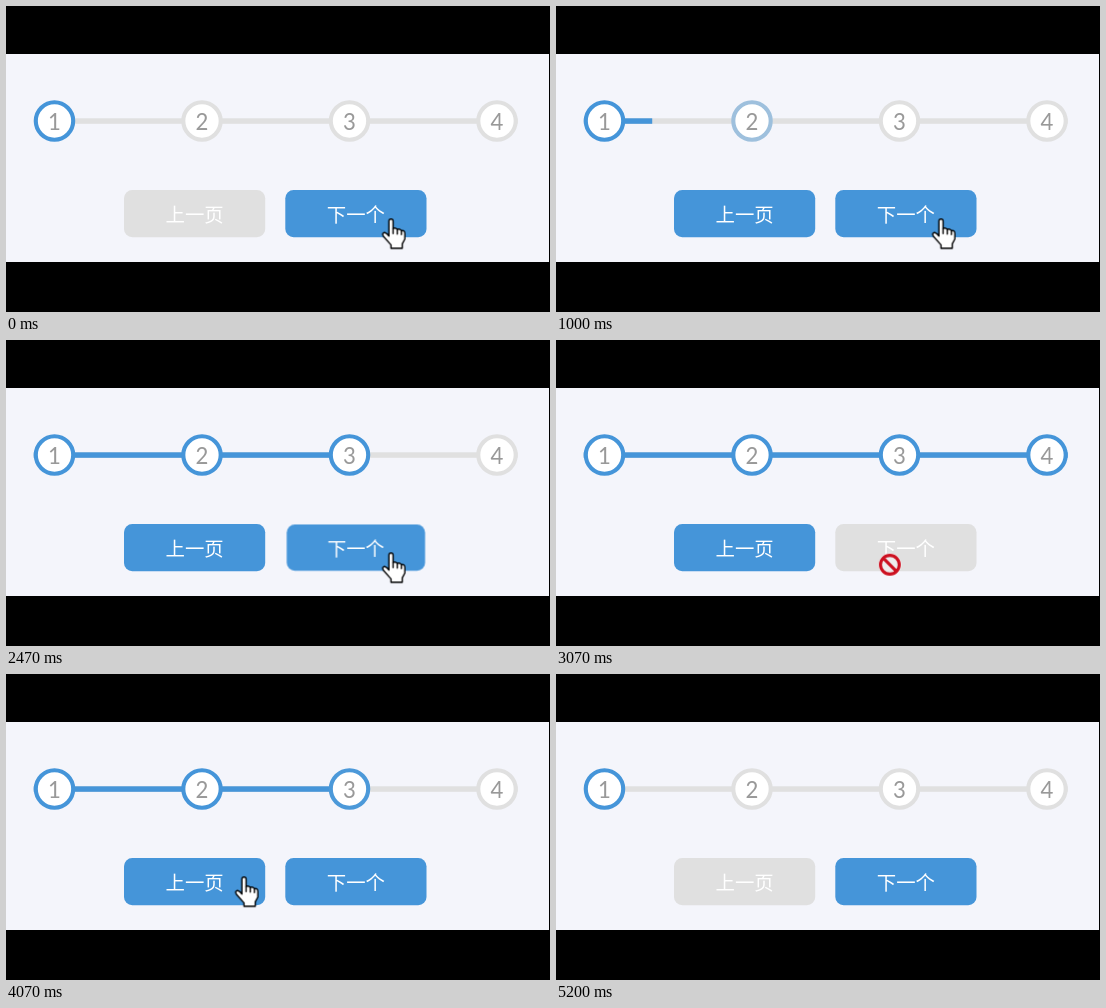
Animation, 544 px wide and 306 px high, one loop 5790 ms. Source, as an HTML page:

```html
<!DOCTYPE html>
<html lang="zh">
<head>
<meta charset="utf-8">
<title>Progress steps</title>
<style>
  html, body { margin: 0; width: 100%; height: 100%; overflow: hidden; background: #000; }
  svg { display: block; width: 544px; height: 306px; }
  text { text-anchor: middle; }
  .step circle { fill: #fff; stroke: #e0e0e0; stroke-width: 4.1px; }
  .step text { font: 22.2px Lato, "Open Sans", sans-serif; fill: #999; }
  .button { transform-box: fill-box; transform-origin: center; }
  .button rect { fill: #e0e0e0; }
  .button text { font: 19.4px "Noto Sans CJK SC", "Noto Sans CJK", sans-serif; fill: #fff; }
  #bar { transform-origin: 27.7px 115px; }
  .pointer { fill: #fff; stroke: #000; stroke-linejoin: round; stroke-linecap: round; opacity: 0; }
</style>
</head>
<body>
<svg viewBox="0 0 544 306">
  <clipPath id="panel"><rect y="48" width="543" height="208"/></clipPath>
  <rect width="544" height="306"/>
  <g clip-path="url(#panel)">
    <rect y="48" width="543" height="208" fill="#f4f5fb"/>
    <rect x="27.7" y="112.3" width="484" height="5.5" fill="#e0e0e0"/>
    <rect id="bar" x="27.7" y="112.3" width="484" height="5.5" fill="#4595d9"/>
    <g id="steps"></g>
    <g id="buttons"></g>
    <g id="cursor">
      <g id="hand" class="pointer" transform="scale(1.386) translate(-6.5 -.5)">
        <path d="M5 2a1.5 1.5 0 0 1 3 0V7.4Q9.5 6.4 11 8Q12.6 7.2 14 8.9Q16.5 8.4 16.5 11V15L14.6 18.5V21.6H6.5V19.2L1 13Q-.2 11 1.4 10.3Q2.7 10 5 12.8Z"/>
        <path d="M8 7.4V11M11 8V11.4M14 9V11.8" fill="none"/>
      </g>
      <g id="blocked" class="pointer">
        <circle r="11.4" fill="#fff" stroke="none"/>
        <path d="M-6.6-6.6L6.6 6.6M9.4 0A9.4 9.4 0 1 1-9.4 0A9.4 9.4 0 1 1 9.4 0"
          fill="#eee" stroke="#cc1020" stroke-width="3.1"/>
      </g>
      <path id="arrow" class="pointer" transform="scale(1.386)"
        d="M0 0V16.5L3.8 12.9L6.4 18.7L8.8 17.6L6.3 12H11.6Z"/>
    </g>
  </g>
</svg>
<script>
const LOOP = 5790, SLIDE = 400;
const BLUE = '#4595d9', GRAY = '#e0e0e0', HOLD = 'steps(1, end)';
const $ = id => document.getElementById(id);

// press time, release time, button, step before, step after
const clicks = [
  [800, 898, 'next', 0, 1],
  [1470, 1645, 'next', 1, 2],
  [2470, 2575, 'next', 2, 3],
  [3230, 3320, 'prev', 3, 2],
  [3930, 4045, 'prev', 2, 1],
  [4530, 4645, 'prev', 1, 0],
];

$('steps').innerHTML = [0, 1, 2, 3].map(i => {
  const x = 48.5 + i * 147.5;
  return `<g class="step"><circle id="ring${i}" cx="${x}" cy="115" r="18.7"/>
    <text x="${x}" y="123.6">${i + 1}</text></g>`;
}).join('');

const button = (id, x, label) => `<g id="${id}" class="button">
  <rect id="${id}Face" x="${x}" y="184" width="141.2" height="47.2" rx="8.3"/>
  <text x="${x + 70.6}" y="216">${label}</text></g>`;
$('buttons').innerHTML = button('prev', 118, '上一页') + button('next', 279.3, '下一个');

// keys: [time, value, easing]; the last value lasts until the loop restarts
function track(id, prop, keys) {
  const frames = [...keys, [LOOP, keys[keys.length - 1][1]]].map(
    ([time, value, easing = HOLD]) => ({ offset: time / LOOP, [prop]: value, easing }));
  $(id).animate(frames, { duration: LOOP, iterations: Infinity });
}

// Eases a value that depends on the current step after every click.
function followSteps(id, prop, valueAt) {
  track(id, prop, [[0, valueAt(0)], ...clicks.flatMap(([, release, , from, to]) => [
    [release, valueAt(from), 'ease'],
    [release + SLIDE, valueAt(to)],
  ])]);
}

followSteps('bar', 'transform', step => `scaleX(${step / 3})`);
for (let i = 0; i < 4; i++) followSteps('ring' + i, 'stroke', step => step >= i ? BLUE : GRAY);

for (const [id, lastStep] of [['prev', 0], ['next', 3]]) {
  const fill = step => step === lastStep ? GRAY : BLUE;
  track(id + 'Face', 'fill', [[0, fill(0)], ...clicks.map(c => [c[1], fill(c[4])])]);
  track(id, 'transform', [[0, 'scale(1)'], ...clicks.filter(c => c[2] === id).flatMap(
    ([press, release]) => [[press, 'scale(.98)'], [release, 'scale(1)']])]);
}

const at = (x, y) => `translate(${x}px, ${y}px)`;
track('cursor', 'transform', [
  [0, at(385, 213)],
  [2870, at(385, 213), 'ease-in'],
  [3070, at(335, 225), 'ease-out'],
  [3210, at(238, 203)],
  [4850, at(238, 203), 'ease-in'],
  [5190, at(290, 262)],
]);

const pointers = [[0, 'hand'], [2575, 'blocked'], [3122, 'arrow'], [3145, 'hand'],
  [4645, 'blocked'], [5085, 'arrow'], [5190, 'none']];
for (const id of ['hand', 'blocked', 'arrow'])
  track(id, 'opacity', pointers.map(([time, kind]) => [time, kind === id ? 1 : 0]));
</script>
</body>
</html>
```
